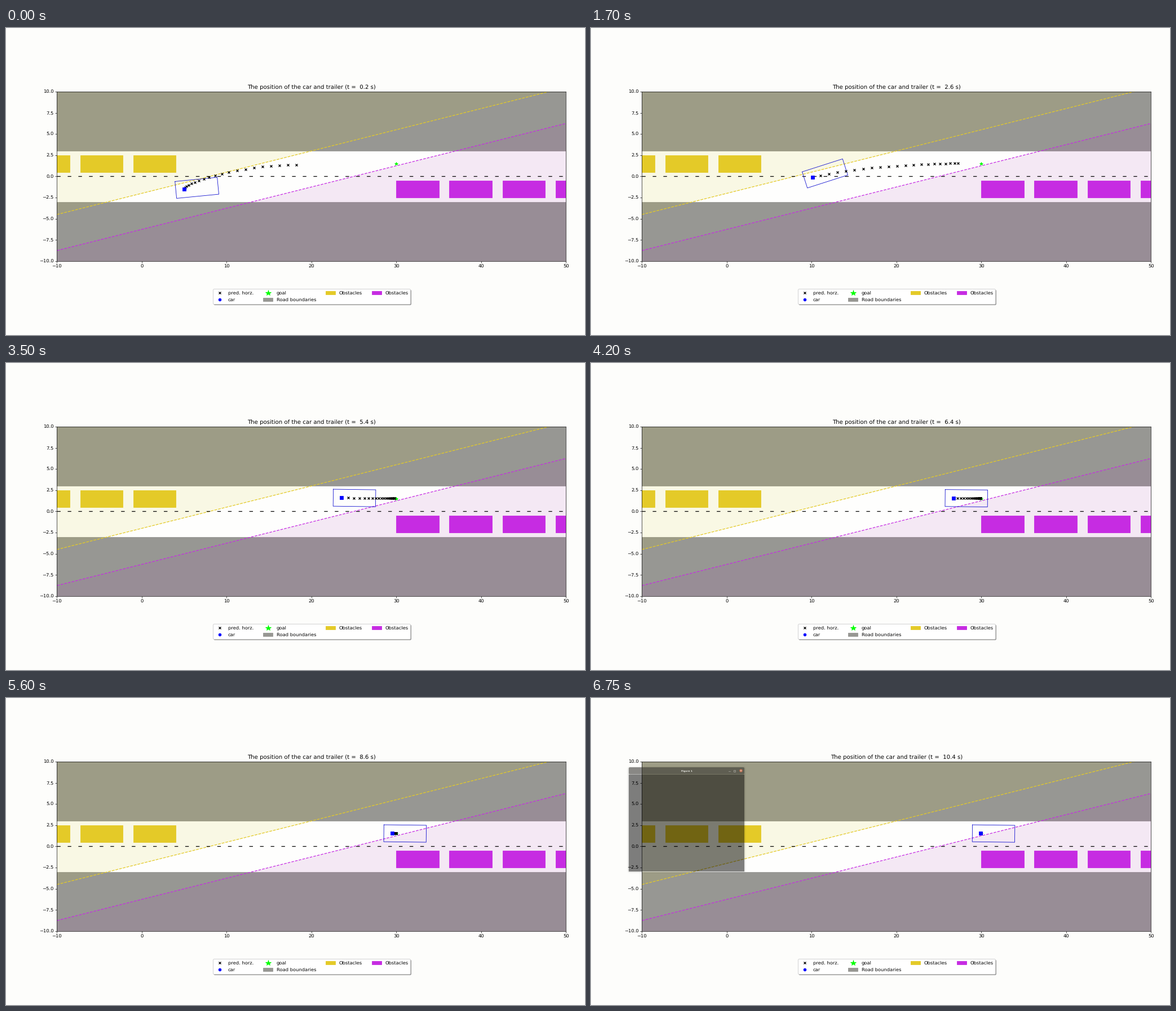
Recreate the animation shown at these times as a matplotlib script. Size 1027 by 545 pixels, loop 6800 ms.

```python
import numpy as np
import matplotlib.pyplot as plt
from matplotlib.animation import FuncAnimation
from matplotlib.lines import Line2D
from matplotlib.patches import Circle, FancyBboxPatch, Patch, Rectangle

W, H, DPI = 1027, 545, 64
K = 60.65 / DPI         # point scale for text and lines
FRAMES, STEP_MS = 136, 50
HORIZON = 20

BG, GRAY = "#fdfdfb", "#979793"
YELLOW, PURPLE = "#e4ca28", "#c62ce2"
YELLOW_TINT, PURPLE_TINT = "#d4c820", "#a83cb4"

plt.rcParams.update({
    "font.family": "DejaVu Sans",
    "font.size": 10 * K,
    "axes.titlesize": 12 * K,
    "axes.titlepad": 6 * K,
    "axes.linewidth": 0.8 * K,
    "patch.linewidth": 1.0 * K,
    "text.hinting": "none",
})
for a in "xy":
    plt.rcParams.update({f"{a}tick.major.size": 3.5 * K,
                         f"{a}tick.major.width": 0.8 * K,
                         f"{a}tick.major.pad": 3.5 * K})


# ---- motion -------------------------------------------------------------

def build_path():
    """x along the drive: speed-up, constant speed, braking at the goal."""
    i = np.arange(24)
    x = np.where(i <= 13, 5 + 0.0382 * i * (i - 0.5), 11.21 + (i - 13))
    ratio = 0.89 - 0.0042 * np.arange(60)
    rest = 8.17 * np.concatenate([[1], np.cumprod(ratio)])
    idx = np.concatenate([i, 23.63 + np.arange(61)])
    return idx, np.concatenate([x, 30 - rest])


PATH_I, PATH_X = build_path()

# x, y and slope at knots of the driven curve
KX = np.array([5, 6.65, 16.85, 23.5, 30])
KY = np.array([-1.5, -1.2, 1.46, 1.6, 1.53])
KM = np.array([0.098, 0.285, 0.08, -0.013, -0.012])


def drive_y(x):
    j = np.clip(np.searchsorted(KX, x, side="right") - 1, 0, len(KX) - 2)
    d = KX[j + 1] - KX[j]
    s = (x - KX[j]) / d
    return ((1 + 2 * s) * (1 - s) ** 2 * KY[j] + s * (1 - s) ** 2 * d * KM[j]
            + s * s * (3 - 2 * s) * KY[j + 1] + s * s * (s - 1) * d * KM[j + 1])


def state(n):
    """Predicted points (first one is the car), car height and heading."""
    w = np.clip((n - 8) / 12, 0, 1)
    k = np.arange(HORIZON + 1)
    x = np.interp(n - 1 + k - 0.37 * w, PATH_I, PATH_X)
    y = drive_y(x)
    h = 0.001
    slope = (drive_y(x[0] + h) - drive_y(x[0] - h)) / (2 * h)
    u = k / HORIZON
    end = np.interp(n, [1, 8], [1.38, 1.52])
    bend = np.interp(n, [1, 8], [1.52, 0.55])
    plan = end - (end - y[0]) * (1 - u) ** 2 * (1 + bend * u)
    return x, (1 - w) * plan + w * y, y[0], np.arctan(slope)


def outline(x, y, angle):
    bx = np.array([-1, 4, 4, -1, -1])
    by = np.array([1, 1, -1, -1, 1])
    c, s = np.cos(angle), np.sin(angle)
    return x + c * bx - s * by, y + s * bx + c * by


# ---- static scene -------------------------------------------------------

fig = plt.figure(figsize=(W / DPI, H / DPI), dpi=DPI, facecolor=BG)
ax = fig.add_axes([90.4 / W, (H - 413.9) / H, 903 / W, 301 / H], facecolor="#fefefd")
ax.set_xlim(-10, 50)
ax.set_ylim(-10, 10)
title = ax.set_title("")

for lo, hi in ((3, 10), (-10, -3)):
    ax.axhspan(lo, hi, color=GRAY, zorder=0.5)

ex = np.array([-10, 50])
yellow_line, purple_line = 0.25 * ex - 2, 0.25 * ex - 6.25
ax.fill_between([-10, 48], [-4.5, 10], 10, color=YELLOW_TINT, alpha=0.11, lw=0, zorder=1)
ax.fill_between(ex, purple_line, -10, color=PURPLE_TINT, alpha=0.11, lw=0, zorder=1)
ax.plot(ex, yellow_line, "--", color=YELLOW, lw=1.5 * K, zorder=2)
ax.plot(ex, purple_line, "--", color=PURPLE, lw=1.5 * K, zorder=2)

for gap in range(3):
    ax.add_patch(Rectangle((-1 - 6.25 * gap, 0.5), 5, 2, color=YELLOW, zorder=1.5))
for gap in range(4):
    ax.add_patch(Rectangle((30 + 6.25 * gap, -2.5), 5, 2, color=PURPLE, zorder=1.5))

ax.plot(ex, [0, 0], color="black", lw=1.5 * K, ls=(0, (5, 10)), zorder=2)
ax.plot([30], [1.5], "*", color="lime", ms=7 * K, mew=1 * K, zorder=2.1)


def dot(marker, color, size, label, edge=1.0):
    return Line2D([], [], ls="none", marker=marker, color=color,
                  ms=size * K, mew=edge * K, label=label)


ax.legend(
    handles=[
        dot("x", "black", 5.3, "pred. horz.", 1.5),
        dot("o", "blue", 5.6, "car"),
        dot("*", "lime", 11.5, "goal"),
        Patch(color=GRAY, label="Road boundaries"),
        Patch(color=YELLOW, label="Obstacles"),
        Patch(color=PURPLE, label="Obstacles"),
    ],
    loc="upper center", bbox_to_anchor=(0.5, -0.15), ncol=4,
    fancybox=True, shadow=True)

# ---- moving parts -------------------------------------------------------

body, = ax.plot([], [], color="#1010d0", lw=1.0 * K, zorder=3)
pred, = ax.plot([], [], "x", color="black", ms=5.3 * K, mew=1.5 * K, zorder=3.1)
car, = ax.plot([], [], "s", color="blue", ms=6 * K, mew=1 * K, zorder=3.2)

# translucent window that opens at the very end
top = fig.add_axes([0, 0, 1, 1], zorder=5)
top.set_xlim(0, W)
top.set_ylim(H, 0)
top.axis("off")
top.patch.set_visible(False)


def pane(x, y, w, h, r, **kw):
    return top.add_patch(FancyBboxPatch(
        (x, y), w, h, boxstyle=f"round,pad=0,rounding_size={r}", lw=0, **kw))


for g in range(1, 4):
    pane(67 - g, 124 - g, 205 + 2 * g, 184 + 2 * g, 3 + g, fc="black", alpha=0.03)
pane(67, 123, 205, 12.5, 2, fc="#35342f", alpha=0.52)
top.add_patch(Rectangle((67, 135.5), 205, 172.5, fc="black", lw=0, alpha=0.45))
PX = 72 / DPI
top.text(169.5, 129.3, "Figure 1", color="#e6e6e0", fontsize=4.3 * PX,
         weight="bold", ha="center", va="center")
top.plot([243.5, 246.5], [130, 130], color="#a5a59c", lw=0.7 * PX)
top.add_patch(Rectangle((253, 127.5), 3, 3, fill=False, ec="#b0b0a8", lw=0.7 * PX))
top.add_patch(Circle((266, 129), 2.7, fc="#c8714f", lw=0))
top.plot([265, 267], [128, 130], color="#eadfd8", lw=0.5 * PX)
top.plot([265, 267], [130, 128], color="#eadfd8", lw=0.5 * PX)


def update(f):
    n = 1 + int(f * STEP_MS / 132 + 0.12)
    x, y, car_y, angle = state(n)
    pred.set_data(x[1:], y[1:])
    car.set_data([x[0]], [car_y])
    body.set_data(*outline(x[0], car_y, angle))
    title.set_text(f"The position of the car and trailer (t =  {0.2 * n:.1f} s)")
    top.set_visible(f == FRAMES - 1)
    return body, pred, car, title


anim = FuncAnimation(fig, update, frames=FRAMES, interval=STEP_MS,
                     repeat=True, repeat_delay=0, blit=False)
plt.show()
```
